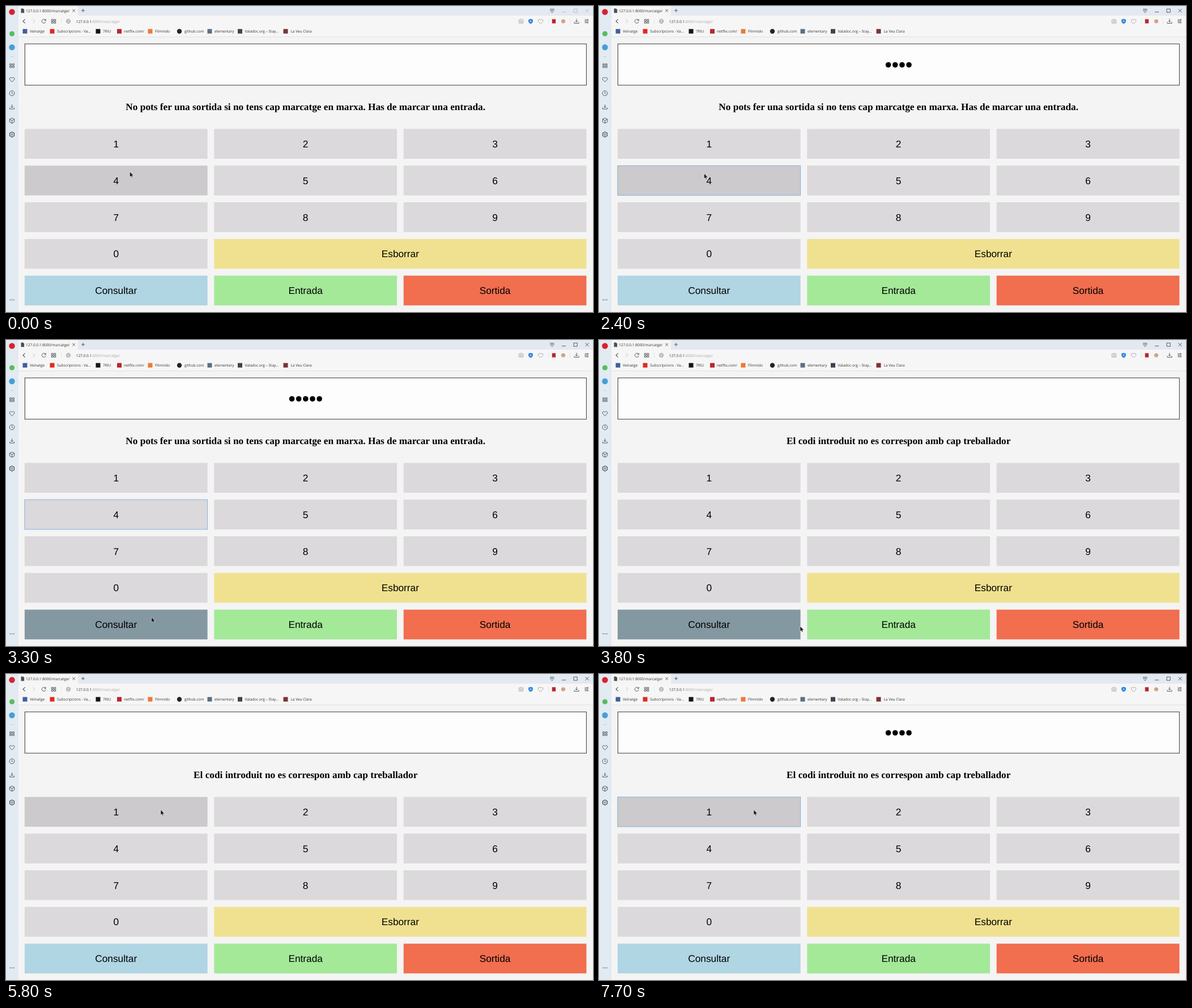
An HTML page that plays this animation: 1036x541 px, repeating every 8 s.

```html
<!DOCTYPE html>
<html lang="ca">
<head>
<meta charset="utf-8">
<title>Marcatge</title>
<style>
html, body { margin: 0; width: 100%; height: 100%; overflow: hidden; background: #f4f4f4; }
svg { display: block; }
text { text-rendering: geometricPrecision; }
.ui { font: 6.5px "Open Sans", "Noto Sans", sans-serif; fill: #333; }
.icon { fill: none; stroke: #454b52; stroke-width: .9; }
.key { font: 17.27px "Liberation Sans", Arial, sans-serif; text-anchor: middle; }
#message { font: bold 17.27px "Liberation Serif", "Times New Roman", serif; text-anchor: middle; }
</style>
</head>
<body>
<svg width="1036" height="541" viewBox="0 0 1036 541">
  <defs>
    <path id="heart" d="M0 4C-2 2.4-4.3.6-4.3-1.4C-4.3-4-1.2-4.4 0-2.2C1.2-4.4 4.3-4 4.3-1.4C4.3.6 2 2.4 0 4Z"/>
    <path id="grid" d="M-3.8-3.3h3v2.6h-3zM.8-3.3h3v2.6h-3zM-3.8.8h3v2.6h-3zM.8.8h3v2.6h-3z"/>
    <path id="load" d="M0-4.3V1.2M-2.2-.9L0 1.3L2.2-.9M-4 1.2V3.6H4V1.2"/>
  </defs>

  <rect width="1036" height="541" fill="#f4f4f4"/>
  <rect width="1036" height="17" fill="#e2e9f1"/>
  <rect width="22" height="541" fill="#e2eaf2"/>
  <rect x="22" width="105" height="18" fill="#f5f5f5"/>
  <rect x="22" y="17" width="1014" height="37.5" fill="#f6f6f6"/>
  <rect x="22" y="54.3" width="1014" height=".8" fill="#d9dcde"/>

  <!-- sidebar -->
  <circle cx="10.5" cy="10.5" r="5.2" fill="#d8232e"/>
  <circle cx="10.5" cy="49" r="4.6" fill="#58bd5b"/>
  <circle cx="10.5" cy="73" r="5.2" fill="#459fd6"/>
  <path d="M8 89.5h5" stroke="#bcc4cc" stroke-width=".8"/>
  <g class="icon">
    <use href="#grid" x="10.5" y="105.5"/>
    <use href="#heart" x="10.5" y="130"/>
    <circle cx="10.5" cy="154.3" r="4.4"/><path d="M10.5 151.6v2.9l2 1.2"/>
    <use href="#load" x="10.5" y="178.5"/>
    <path d="M10.5 198l4.2 2.2v4.8l-4.2 2.3l-4.2-2.3v-4.8zM6.3 200.2l4.2 2.2l4.2-2.2M10.5 202.4v4.9"/>
    <path d="M10.5 222.6l4 2.3v4.6l-4 2.3l-4-2.3v-4.6z" stroke-width="1.2"/><circle cx="10.5" cy="227.2" r="1.6"/>
  </g>
  <path d="M6.5 519.5h1.4m1.9 0h1.4m1.9 0h1.4" stroke="#454b52" stroke-width="1.4"/>

  <!-- tab bar -->
  <path d="M26.5 4.4h3.6l2 2v5.8h-5.6z" fill="#4a4f55"/>
  <text class="ui" x="35" y="10.7">127.0.0.1:8000/marcatge/</text>
  <g class="icon">
    <path d="M117.2 5.8l4.8 4.8m0-4.8l-4.8 4.8M133 8h6m-3-3v6"/>
    <path d="M960 5.7h7.6M960 8h7.6M961.8 9.8l2 1.9l2-1.9"/>
    <path id="controls" d="M981 10.7h7M1002 5.2h6.2v6h-6.2zM1022.6 5.2l6 6m0-6l-6 6"/>
  </g>

  <!-- toolbar -->
  <g class="icon">
    <path d="M33.6 23.4l-3.6 3.5l3.6 3.5" stroke-width="1.1"/>
    <path d="M47.6 23.6l3.4 3.3l-3.4 3.3" stroke="#b9bcc0"/>
    <path d="M69.8 25.2a3.5 3.5 0 1 0 .3 2.6M70.2 23v2.6h-2.6"/>
    <use href="#grid" x="84" y="27"/>
    <g stroke="#85898e" stroke-width=".7">
      <circle cx="110" cy="27" r="3.7"/><ellipse cx="110" cy="27" rx="1.6" ry="3.7"/><path d="M106.3 27h7.4"/>
      <path d="M905.3 24.6h1.7l.8-1.2h2.4l.8 1.2h1.7v5.6h-7.4z"/><circle cx="909" cy="27.2" r="1.5"/>
      <use href="#heart" x="943.5" y="27.2"/>
    </g>
    <path d="M97.5 22v10M957.5 22v10M995.5 22v10" stroke="#e0e2e4" stroke-width=".7"/>
    <use href="#load" x="1007" y="27"/>
    <path d="M1021.3 24.3h7M1021.3 26.9h7M1021.3 29.5h7M1026.5 23.3v2M1023 25.9v2M1026 28.5v2"/>
  </g>
  <path d="M926 22.7l3.9 1.3v3.2q-.3 2.8-3.9 4.3q-3.6-1.5-3.9-4.3v-3.2z" fill="#2d83df"/>
  <path d="M924.7 25.6l2.6 2.6m0-2.6l-2.6 2.6" stroke="#fff" stroke-width=".8"/>
  <rect x="963.7" y="23.3" width="6.4" height="7.4" fill="#b8272b"/>
  <circle cx="983.5" cy="27" r="3.6" fill="#d5a184"/>
  <text class="ui" x="123.7" y="29.5">127.0.0.1<tspan fill="#a9a9a9">:8000/marcatge/</tspan></text>

  <g id="bookmarks" class="ui"></g>

  <!-- page -->
  <rect x="33.3" y="67" width="991" height="73" fill="#fdfdfd" stroke="#222" stroke-width=".9"/>
  <g id="dots"></g>
  <text id="message" x="528.7" y="184.4"></text>
  <g id="keys"></g>
  <rect id="ring" width="322.7" height="52.6" fill="none" stroke="#83b3dd"/>
  <path id="cursor" d="M0 0V9.3L2.1 7.5L3.5 10.4L5 9.7L3.7 6.9H6.6Z" fill="#151515" stroke="#f2f2f2" stroke-width=".6"/>
</svg>
<script>
const $ = id => document.getElementById(id);

function add(parent, tag, attrs, text = '') {
  const el = document.createElementNS('http://www.w3.org/2000/svg', tag);
  for (const name in attrs) el.setAttribute(name, attrs[name]);
  el.textContent = text;
  return parent.appendChild(el);
}

// icon x, label x, colour, label
[
  [33.5, 42, '#3f5f9e', 'Veïnatge'],
  [81.5, 90, '#e02a20', 'Subscripcions - Va...'],
  [162.5, 171, '#151515', '7RIU'],
  [200, 208, '#b8272b', 'netflix.com/'],
  [254.5, 263, '#ec7a35', 'Filmnido'],
  [306, 315, '#202428', 'github.com'],
  [359.5, 368, '#5b6f84', 'elementary'],
  [413, 421.5, '#3b4450', 'Valadoc.org – Stay...'],
  [493.5, 502.5, '#7d3236', 'La Veu Clara']
].forEach(([x, tx, fill, label]) => {
  if (label === 'github.com') add($('bookmarks'), 'circle', {cx: x, cy: 44.7, r: 4.2, fill});
  else add($('bookmarks'), 'rect', {x: x - 4, y: 40.7, width: 8, height: 8, fill});
  add($('bookmarks'), 'text', {x: tx, y: 47}, label);
});

const GREY = '#dbd9db', DARK = '#cccacc', KEY_W = 322.7, KEY_H = 52.6;
const keys = {};

function addKey(label, col, row, fill = GREY, hover = DARK, w = KEY_W) {
  const x = 32.9 + col * 334.4, y = 217.4 + row * 64.83;
  const rect = add($('keys'), 'rect', {x, y, width: w, height: KEY_H});
  add($('keys'), 'text', {class: 'key', x: x + w / 2, y: y + 32.5}, label);
  keys[label] = {x, y, w, rect, fill, hover};
}

for (let n = 1; n < 10; n++) addKey(n, (n - 1) % 3, Math.floor((n - 1) / 3));
addKey(0, 0, 3);
addKey('Esborrar', 1, 3, '#efe18f', '#d9cc82', 657.1);
addKey('Consultar', 0, 4, '#b0d5e3', '#8498a1');
addKey('Entrada', 1, 4, '#a3e998', '#80b878');
addKey('Sortida', 2, 4, '#f16e4f', '#c05a42');

const dots = Array.from({length: 5}, () => add($('dots'), 'circle', {cy: 104, r: 4.8}));

// pointer: time, x, y
const path = [
  [0, 218.5, 293], [100, 213, 280], [200, 202, 255], [300, 195.7, 242],
  [1900, 195.7, 242], [2300, 185.5, 296], [2800, 185.5, 296], [3300, 256.7, 490],
  [3600, 355, 506], [3800, 355, 506], [4500, 392.5, 203], [4600, 420, 185],
  [4800, 443, 160], [5000, 440, 157], [5200, 400, 175], [5500, 313, 210],
  [5800, 273, 240], [8000, 273, 240]
];
const SENT = 3800;
const presses = [900, 1100, 1500, 2100, 2500, 6500, 6700, 7100, 7700];
const focus = [[0, ''], [500, 1], [2300, 4], [3500, 'Consultar'], [SENT, ''], [6100, 1]];

function pointer(t) {
  const i = path.findIndex(p => p[0] > t);
  const [t0, x0, y0] = path[i - 1], [t1, x1, y1] = path[i];
  const k = (t - t0) / (t1 - t0);
  return [x0 + (x1 - x0) * k, y0 + (y1 - y0) * k];
}

function draw(t) {
  const [px, py] = pointer(t);
  $('cursor').setAttribute('transform', `translate(${px} ${py})`);
  for (const {x, y, w, rect, fill, hover} of Object.values(keys)) {
    const over = px >= x && px < x + w && py >= y && py < y + KEY_H;
    rect.setAttribute('fill', over ? hover : fill);
  }

  const focused = keys[focus.findLast(f => f[0] <= t)[1]];
  $('ring').style.display = focused ? '' : 'none';
  if (focused) {
    $('ring').setAttribute('x', focused.x);
    $('ring').setAttribute('y', focused.y);
  }

  const count = presses.filter(p => p <= t && (p > SENT) === (t >= SENT)).length;
  dots.forEach((dot, i) => {
    dot.style.display = i < count ? '' : 'none';
    dot.setAttribute('cx', 528.8 + (i - (count - 1) / 2) * 12.15);
  });

  $('message').textContent = t < SENT
    ? 'No pots fer una sortida si no tens cap marcatge en marxa. Has de marcar una entrada.'
    : 'El codi introduit no es correspon amb cap treballador';
  $('controls').style.stroke = t < 600 ? '#b4bac0' : '';
}

const start = performance.now();
function tick() {
  draw(Math.floor((performance.now() - start) % 8000 / 100) * 100);
  requestAnimationFrame(tick);
}
tick();
</script>
</body>
</html>
```
